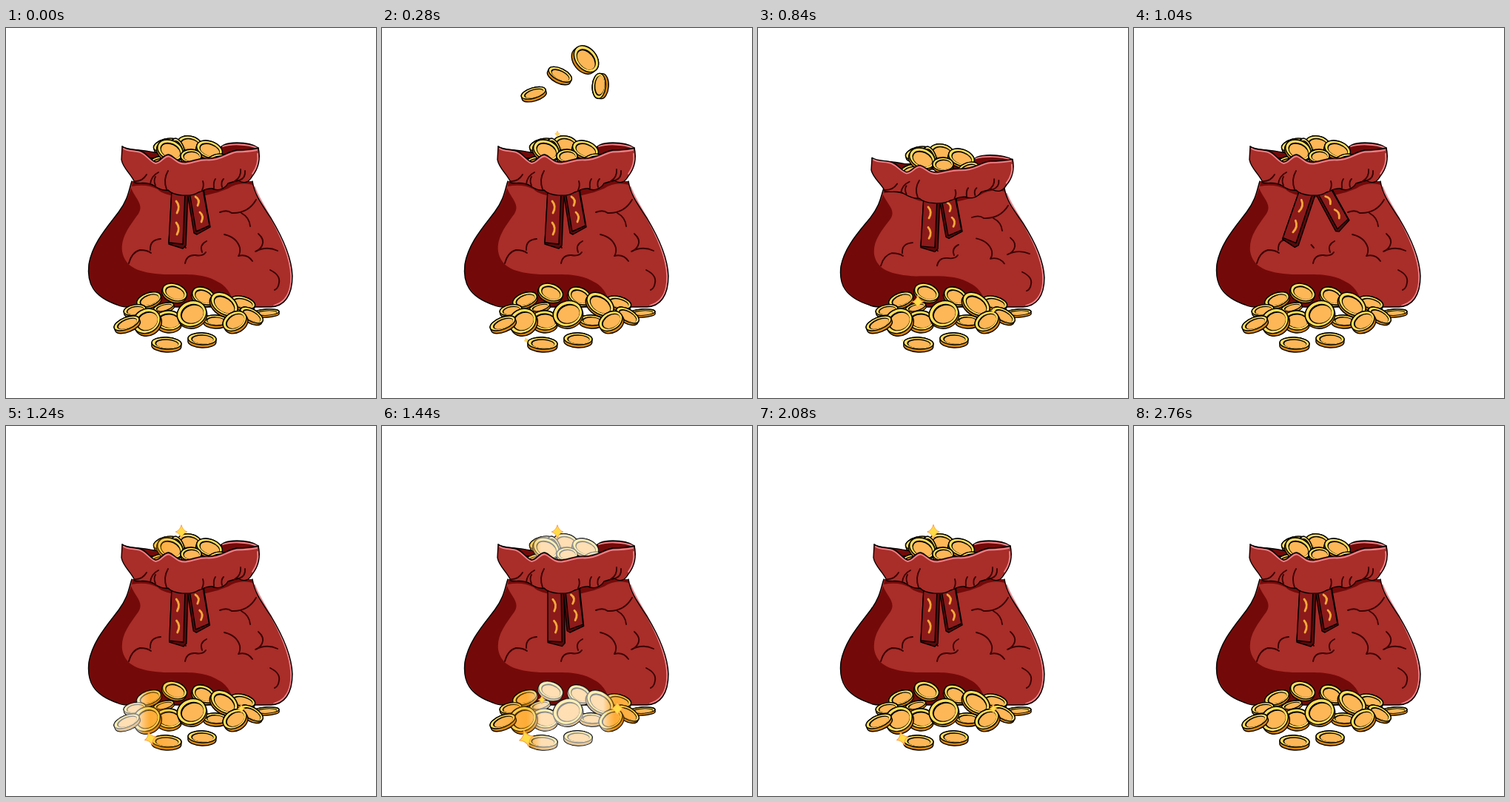
An HTML page that plays this animation: 500 by 500 pixels, repeating every 3.04 s.

```html
<!DOCTYPE html>
<html lang="en">
<head>
<meta charset="utf-8">
<title>Bag of coins</title>
<style>
html, body { margin: 0; width: 100%; height: 100%; overflow: hidden; background: #fff; }
svg { display: block; width: 100%; height: 100%; }
.ink { stroke: #000; stroke-width: 1.4; stroke-linejoin: round; stroke-linecap: round; }
.line { fill: none; stroke: #3a0303; stroke-width: 1.9; stroke-linecap: round; stroke-linejoin: round; }
.pink { fill: none; stroke: #ee8288; stroke-width: 1.8; stroke-linecap: round; }
.stitch { fill: none; stroke: #f5a83c; stroke-width: 2.8; stroke-linecap: round; }
</style>
</head>
<body>
<svg viewBox="0 0 500 500">
  <defs>
    <linearGradient id="glow">
      <stop offset="0" stop-color="#ff9a00" stop-opacity="0"/>
      <stop offset=".2" stop-color="#ff9a00" stop-opacity=".38"/>
      <stop offset=".3" stop-color="#fff" stop-opacity=".55"/>
      <stop offset=".72" stop-color="#fff" stop-opacity=".55"/>
      <stop offset=".8" stop-color="#ff9a00" stop-opacity=".38"/>
      <stop offset="1" stop-color="#ff9a00" stop-opacity="0"/>
    </linearGradient>
    <clipPath id="heapClip"></clipPath>
    <clipPath id="pileClip"></clipPath>
  </defs>

  <g id="back">
    <path class="ink" fill="#730a09" d="M157 160 C166 166 180 163 200 168 L285 168 C290 158 298 155 312 155 C326 155 334 157 341 162 L338 176 L170 176 Z"/>
    <path class="pink" d="M293 160 Q302 157 315 157.500 Q330 158 339 162"/>
  </g>

  <g id="heap">
    <g id="heapCoins"></g>
    <g clip-path="url(#heapClip)"><rect class="shine" y="130" width="200" height="80" fill="url(#glow)"/></g>
    <g id="topStar"></g>
  </g>
  <g id="flyers"></g>

  <g id="body">
    <path fill="#a92d29" d="M170 207 C166 218 166 230 152 249 C136 270 117 291 112 319 C109 345 118 363 150 374 Q155 377 165 377 L358 377 C376 376 387 362 387 335 C386 308 372 280 358 257 C347 240 336 226 333 207 Z"/>
    <path fill="#730a09" d="M169 216 C174 230 187 238 179 251 C166 269 155 283 157 302 C161 324 180 331 214 333 C250 333 268 331 290 345 Q304 354 309 377 L165 377 C133 374 108 352 112 319 C117 291 136 270 152 249 C163 234 166 226 169 216 Z"/>
    <path fill="#730a09" d="M171 207 L333 207 L334 212 Q315 207 300 217 Q275 228 240 229 Q212 226 205 218 Q190 210 170 214 Z"/>
    <path class="pink" d="M336 215 C344 236 357 252 368 276 C381 303 388 330 384 350 Q380 370 362 375"/>
    <path class="ink" fill="none" d="M170 207 C166 218 166 230 152 249 C136 270 117 291 112 319 C109 345 118 363 150 374 Q155 377 165 377 L358 377 C376 376 387 362 387 335 C386 308 372 280 358 257 C347 240 336 226 333 207"/>
    <path class="line" d="M166 318 Q170 303 181 300 Q191 300 196 304 M195 300 Q194 286 209 285
      M242 318 Q244 306 256 307 Q266 309 270 303 M265 303 Q261 293 271 288
      M295 279 Q312 283 316 297 Q317 304 314 308 Q326 305 333 315
      M341 278 Q350 286 346 294 Q343 300 337 302 Q352 294 367 301
      M289 249 Q299 245 305 250 Q327 251 338 232 M318 250 Q329 256 330 268
      M357 327 Q371 334 369 344 Q368 352 363 354 M239.500 293 L243 297"/>
    <g id="strapL">
      <path class="ink" fill="#5a0808" d="M224 220 L246 221 L243 294 L239 298 L220 292 Z"/>
      <path class="ink" fill="#8c1a1a" d="M224 219 L242 221 L239 292 L220 290 Z"/>
      <path class="stitch" d="M230 234 Q236 241 231 250 M230 263 Q236 270 231 279"/>
    </g>
    <g id="strapR">
      <path class="ink" fill="#5a0808" d="M245 222 L267 218 L276 269 L258 279 L254 277 Z"/>
      <path class="ink" fill="#8c1a1a" d="M248 222 L266 218 L275 267 L257 275 Z"/>
      <path class="stitch" d="M256 228 Q263 232 259 240 M262 249 Q268 254 264 262"/>
    </g>
  </g>

  <g id="collar">
    <path class="ink" fill="#a92d29" d="M157 160 C164 166 176 163 184 167 C192 171 194 178 202 181 C210 180 212 171 220 171 C228 173 230 182 243 181 C256 179 262 175 274 176 C292 176 298 167 312 165 Q328 165 341 162 C344 176 341 190 333 200 C328 209 322 211 314 206 Q306 208 300 210 C296 217 287 221 279 217 C270 216 265 221 260 222 C250 229 226 227 219 219 C212 220 204 216 200 213 C190 207 184 211 174 209 C170 198 158 190 156 178 Z"/>
    <path class="pink" d="M159 163 C166 168 176 165 183 169 C191 173 194 180 202 183 C211 182 213 173 220 173.500 C228 176 231 184.500 243 183.500 C256 181.500 262 177.500 274 178.500 C292 178.500 298 169.500 312 167.500 Q328 167 339 165 M340 170 Q342 184 333 197"/>
    <path class="line" d="M195 211 Q196 200 206 195 M217 218 Q212 205 219 193 M202 213 Q199 206 202 201 M265 219 Q268 213 266 207 M281 216 Q280 208 283 204 M292 215 Q290 208 294 204 M309 207 Q318 202 317 191 M315 206 Q324 203 323 193 M173 207 Q184 208 190 198"/>
  </g>

  <g id="pile"></g>
  <g clip-path="url(#pileClip)"><rect class="shine" y="340" width="200" height="105" fill="url(#glow)"/></g>
  <g id="stars"></g>
</svg>
<script>
const NS = 'http://www.w3.org/2000/svg';
const $ = id => document.getElementById(id);

function add(parent, tag, attrs) {
  const el = document.createElementNS(NS, tag);
  for (const k in attrs) el.setAttribute(k, attrs[k]);
  return parent.appendChild(el);
}

const place = (x, y, a) => `translate(${x} ${y}) rotate(${a})`;
const hull = (rx, ry, h) =>
  `M${-rx} 0A${rx} ${ry} 0 0 1 ${rx} 0V${h}A${rx} ${ry} 0 0 1 ${-rx} ${h}Z`;

function coin(parent, [x, y, rx, ry, a, h = 3], clip) {
  const g = add(parent, 'g', { transform: place(x, y, a) });
  const d = hull(rx, ry, h);
  add(g, 'path', { d, fill: '#d8860f', class: 'ink' });
  add(g, 'ellipse', { rx, ry, fill: '#ffdf5c', class: 'ink' });
  add(g, 'ellipse', { cx: .4, cy: .5, rx: rx * .8, ry: ry * .77, fill: '#000' });
  add(g, 'ellipse', { cx: 1, cy: 1.2, rx: rx * .74, ry: ry * .68, fill: '#feb757' });
  if (clip) add(clip, 'path', { d, transform: place(x, y, a) });
  return g;
}

// x, y, rx, ry, angle, thickness
const heap = [
  [216, 158, 17, 8, -15], [248, 156, 16, 10, 10], [233, 160, 12, 6, 60],
  [275, 164, 18, 11, 20], [305, 182, 12, 7, -5], [206, 182, 14, 8, -15],
  [284, 180, 15, 9, -20], [222, 165, 18, 13, 25], [250, 173, 14, 9, 0]
];
const pile = [
  [228, 357, 17, 11, 20], [193, 367, 17, 9, -20], [267, 362, 16, 11, 25],
  [320, 371, 17, 8, 15], [174, 381, 15, 7, -10], [213, 377, 14, 5, -15],
  [295, 373, 20, 13, 35], [352, 384, 17, 4, -3], [220, 395, 18, 13, 5, 4],
  [283, 395, 16, 7, 3, 4], [332, 388, 17, 8, 30], [251, 386, 20, 17, -20, 3],
  [190, 396, 19, 16, -30, 4], [163, 399, 18, 8, -22, 4],
  [309, 396, 17, 12, -30, 4], [217, 426, 20, 8, 3, 4], [265, 420, 19, 8, 2, 4]
];
heap.forEach(c => coin($('heapCoins'), c, $('heapClip')));
pile.forEach(c => coin($('pile'), c, $('pileClip')));

// place and angle on the way down, top of the flight, spin, size
const flights = [
  { x: 200, y: 137, a: -50, top: 86, spin: -.14, rx: 17, ry: 7 },
  { x: 240, y: 138, a: 65, top: 60, spin: .16, rx: 17, ry: 8 },
  { x: 298, y: 141, a: -50, top: 76, spin: .15, rx: 17, ry: 9 },
  { x: 279, y: 116, a: 75, top: 39, spin: .1, rx: 20, ry: 14 }
];
flights.forEach(f => f.el = coin($('flyers'), [f.x, f.y, f.rx, f.ry, f.a, 4]));

// place, radius, first peak, gap between peaks, half length
const stars = [
  { x: 237, y: 143, r: 10.5, at: 520, gap: 820, half: 320, home: 'topStar' },
  { x: 195, y: 422, r: 12, at: 540, gap: 840, half: 320, tilt: -18 },
  { x: 318, y: 382, r: 10, at: 600, gap: 830, half: 320 },
  { x: 216, y: 370, r: 9.5, at: 800, gap: 760, half: 210 }
];
stars.forEach(s => {
  s.el = add($(s.home || 'stars'), 'path', {
    d: 'M0 -1Q.2 -.2 .85 0Q.2 .2 0 1Q-.2 .2 -.85 0Q-.2 -.2 0 -1Z',
    fill: '#ffdc45', stroke: '#ff9d4d', 'stroke-width': .1, 'stroke-linejoin': 'round'
  });
});

const clamp = v => Math.max(0, Math.min(1, v));
const smooth = v => (v = clamp(v), v * v * (3 - 2 * v));
const shines = document.querySelectorAll('.shine');
const set = (id, v) => $(id).setAttribute('transform', v);

function fly(f, t) {
  const rise = clamp((t - 60) / 200), out = 1 - (1 - rise) ** 2;
  const y = t < 260 ? 205 - (205 - f.top) * out
                    : f.top + (f.y - f.top) * ((t - 260) / 260) ** 1.3;
  const x = 248 + (f.x - 248) * (.45 + .55 * smooth((t - 60) / 300));
  f.el.setAttribute('visibility', t >= 80 && y < 205 ? 'visible' : 'hidden');
  f.el.setAttribute('transform', place(x, y, f.a + f.spin * (t - 520)));
}

function twinkle(s, t) {
  let k = 0;
  for (let i = 0; i < 3; i++) {
    const d = Math.abs(t - s.at - i * s.gap) / s.half;
    if (d < 1) k = Math.max(k, Math.sin((1 - d) * Math.PI / 2));
  }
  s.el.setAttribute('visibility', k > .02 ? 'visible' : 'hidden');
  s.el.setAttribute('transform', `${place(s.x, s.y, s.tilt || 0)} scale(${s.r * k})`);
}

function swing(t) {
  const p = (t - 860) / 360;
  if (p < 0 || p > 2) return 0;
  return Math.sin(p * Math.PI) * (p < 1 ? 1 : .22);
}

function draw(t) {
  const q = t < 840 ? smooth((t - 660) / 180) : 1 - smooth((t - 840) / 180);
  const squash = (w, h) =>
    `translate(249 377) scale(${1 + w * q} ${1 - h * q}) translate(-249 -377)`;
  set('body', squash(0, .055));
  set('collar', squash(.032, .07));
  set('back', squash(.032, .075));
  set('heap', `translate(0 ${11 * q})`);

  const w = swing(t);
  set('strapL', `rotate(${16 * w} 234 220)`);
  set('strapR', `rotate(${-19 * w} 256 220)`);

  flights.forEach(f => fly(f, t));
  stars.forEach(s => twinkle(s, t));

  const on = t > 1120 && t < 1780;
  shines.forEach(r => {
    r.setAttribute('visibility', on ? 'visible' : 'hidden');
    r.setAttribute('x', 155 + (t - 1440) * .6);
  });
}

function tick(now) {
  const t = now % 3040;
  draw(t < 80 ? 0 : Math.min(2760, Math.floor(t / 40) * 40));
  requestAnimationFrame(tick);
}
draw(0);
const start = performance.now();
requestAnimationFrame(n => tick(Math.max(0, n - start)));
</script>
</body>
</html>
```
